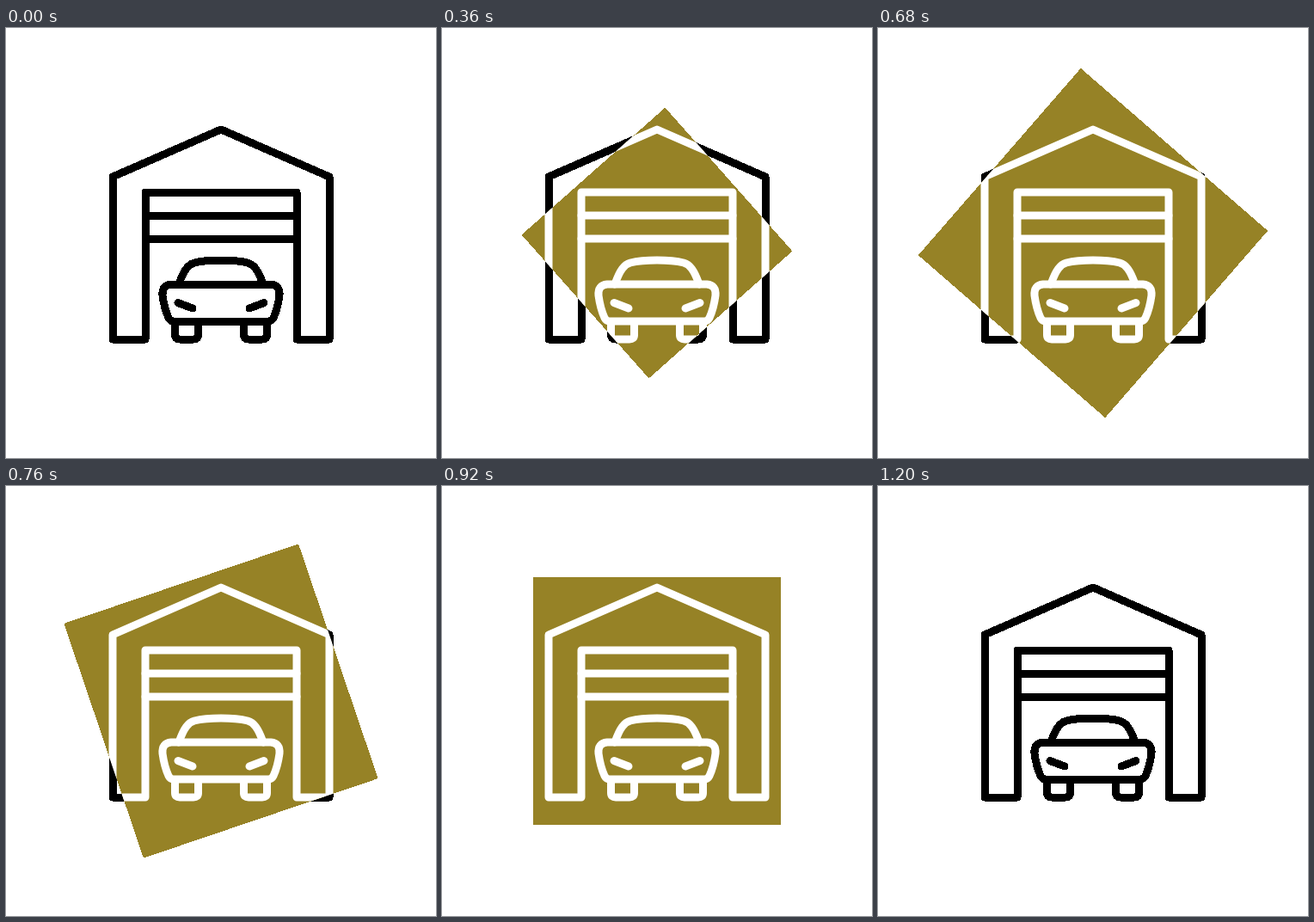
These frames come from a looping animation (500 px wide and 500 px high, 1280 ms). An HTML page:

```html
<!DOCTYPE html>
<html lang="en">
<head>
<meta charset="utf-8">
<title>Garage</title>
<style>
html, body { margin: 0; width: 100%; height: 100%; overflow: hidden; background: #fff; }
svg { display: block; width: 100vw; height: 100vh; }
#icon { fill: none; stroke-width: 9; stroke-linecap: round; stroke-linejoin: round; }
.crisp { shape-rendering: crispEdges; }
</style>
</head>
<body>
<svg viewBox="0 0 500 500">
  <defs>
    <g id="icon">
      <path d="M124 173 L250 118 L376 173 V362 H338 V191 H162 V362 H124 Z"/>
      <path d="M162 218 H338 M162 245 H338"/>
      <path d="M201 298 C207 281 212 275 219 273 Q231 270 250 270 Q269 270 281 273 C288 275 293 281 299 298"/>
      <path d="M192 298 H308 Q319 299 318 311 Q316 326 311 337 Q309 341 305 341 H195 Q191 341 189 337 Q184 326 182 311 Q181 299 192 298 Z"/>
      <path id="lamp" d="M200 319.500 L217 326"/>
      <path id="wheel" d="M196.500 342 V357 Q196.500 362 202 362 H218 Q223.500 362 223.500 357 V342"/>
      <g transform="matrix(-1 0 0 1 500 0)"><use href="#lamp"/><use href="#wheel"/></g>
    </g>
    <clipPath id="window"><rect class="tile" x="-144" y="-144" width="288" height="288"/></clipPath>
  </defs>
  <use class="crisp" href="#icon" stroke="#000"/>
  <rect class="tile crisp" x="-144" y="-144" width="288" height="288" fill="#968226"/>
  <g clip-path="url(#window)"><use href="#icon" stroke="#fff"/></g>
</svg>
<script>
const LOOP = 1280, STEP = 40;
const tiles = document.querySelectorAll('.tile');

// Eased progress from 0 to 1 between two times
function ease(t, start, end) {
  const x = Math.min(1, Math.max(0, (t - start) / (end - start)));
  return x * x * (3 - 2 * x);
}

function draw() {
  const t = Math.floor(performance.now() % LOOP / STEP) * STEP;
  const size = ease(t, 0, 520) - ease(t, 985, 1200);
  const turn = 280 * ease(t, 23, 702) + 80 * ease(t, 544, 859) - 360 * ease(t, 992, 1207);
  for (const tile of tiles) {
    tile.setAttribute('transform', `translate(250 250) rotate(${turn}) scale(${size})`);
  }
  requestAnimationFrame(draw);
}
draw();
</script>
</body>
</html>
```
